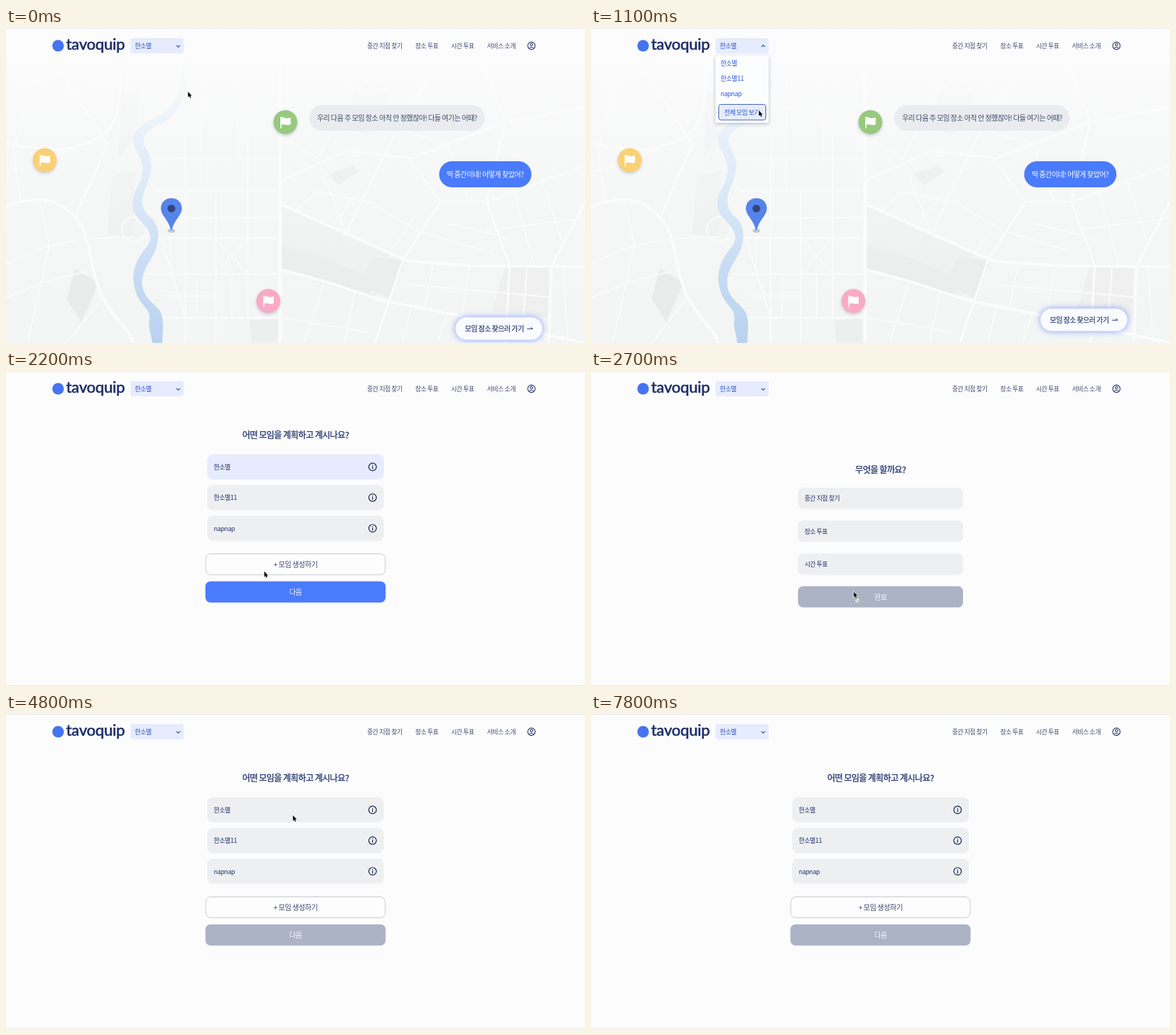
Animation of 800 by 435 pixels, one loop 7900 ms. Source, as an HTML page with a canvas:

```html
<!DOCTYPE html>
<html lang="ko">
<head>
<meta charset="utf-8">
<title>모임 장소 찾기</title>
<style>
html, body { margin: 0; width: 100%; height: 100%; overflow: hidden; background: #fcfcfd; }
canvas { display: block; width: 800px; height: 435px; }
</style>
</head>
<body>
<canvas id="stage" width="800" height="435"></canvas>
<script>
const ctx = document.getElementById('stage').getContext('2d');
const LOOP = 7900, STEP = 100;
const KO = '"Noto Sans CJK KR", "Noto Sans CJK JP", "Noto Sans CJK", sans-serif';
const NAVY = '#1d2f6b', BLUE = '#4a7bfc', PALE = '#e6ecfe', CARD = '#eeeff1', MUTED = '#abb3c4';
const GROUPS = ['한소별', '한소별11', 'napnap'];
const TASKS = ['중간 지점 찾기', '장소 투표', '시간 투표'];

// Pointer stops: time, x, y
const POINTER = [
  [0, 251.5, 88], [500, 236, 23], [700, 236, 23], [1000, 232, 114], [1300, 232, 114],
  [1700, 335, 130], [1900, 335, 130], [2300, 361, 304], [2500, 361, 304], [2700, 363, 305],
  [3200, 396.5, 142], [3300, 396.5, 140], [5200, 396.5, 140], [5700, 394.5, 179],
  [6500, 394.5, 179], [7200, 470, -14], [7900, 470, -14]
];

function pointerAt(t) {
  const i = POINTER.findIndex(p => p[0] > t);
  const [t0, x0, y0] = POINTER[i - 1], [t1, x1, y1] = POINTER[i];
  const u = (t - t0) / (t1 - t0), e = u * u * (3 - 2 * u);
  return [x0 + (x1 - x0) * e, y0 + (y1 - y0) * e];
}

function text(s, x, y, size, color, { align = 'left', weight = 500, bold = 0 } = {}) {
  ctx.font = `${weight} ${size}px ${KO}`;
  ctx.letterSpacing = `${-0.05 * size}px`;
  ctx.textAlign = align;
  ctx.textBaseline = 'alphabetic';
  ctx.fillStyle = color;
  ctx.fillText(s, x, y + size * 0.36);
  if (bold) {
    ctx.strokeStyle = color;
    ctx.lineWidth = bold;
    ctx.strokeText(s, x, y + size * 0.36);
  }
}

function box(x, y, w, h, r, fill, stroke) {
  ctx.beginPath();
  ctx.roundRect(x, y, w, h, r);
  if (fill) { ctx.fillStyle = fill; ctx.fill(); }
  if (stroke) { ctx.strokeStyle = stroke; ctx.lineWidth = 1; ctx.stroke(); }
}

function disc(x, y, r, fill) {
  ctx.beginPath();
  ctx.arc(x, y, r, 0, 7);
  ctx.fillStyle = fill;
  ctx.fill();
}

function ring(x, y, r, color, width) {
  ctx.beginPath();
  ctx.arc(x, y, r, 0, 7);
  ctx.strokeStyle = color;
  ctx.lineWidth = width;
  ctx.stroke();
}

function shape(d, fill) {
  ctx.fillStyle = fill;
  ctx.fill(new Path2D(d));
}

function line(d, color, width) {
  ctx.strokeStyle = color;
  ctx.lineWidth = width;
  ctx.stroke(new Path2D(d));
}

function shaded(color, blur, dy, draw) {
  ctx.save();
  ctx.shadowColor = color;
  ctx.shadowBlur = blur;
  ctx.shadowOffsetY = dy;
  draw();
  ctx.restore();
}

function map() {
  ctx.fillStyle = '#f4f5f5';
  ctx.fillRect(0, 0, 800, 435);

  // Blocks
  shape('M146 205L180 196 176 250 184 290 140 285Z', '#eeefef');
  shape('M95 332L128 352 104 406 84 374Z', '#e9eaea');
  shape('M336 404L376 400V435H340Z', '#edeeee');
  shape('M160 90L185 82 178 150 155 180Z', '#eeefef');
  shape('M381 246L530 312 512 372 381 332Z', '#eff0f0');
  shape('M381 300L440 318 512 346 500 372 381 335Z', '#ebecec');
  shape('M508 316L552 320 530 374 488 352Z', '#ebecec');
  shape('M690 326L750 328 748 400 672 390Z', '#eeefee');
  shape('M446 202L480 190 488 198 460 217Z', '#e9eaea');
  shape('M478 92L512 70 528 96 498 150 484 140Z', '#eeefef');

  // Streets
  const major = '#fcfcfc', minor = '#fafbfb';
  line('M0 246C40 232 70 232 96 262S112 330 134 372 168 410 176 435', major, 4);
  line('M0 158C50 172 92 172 130 150S156 60 160 0M96 262L140 160 74 60', major, 3);
  line('M0 325L60 300 104 292M0 372L50 352 112 336M30 435L60 300 46 236M84 435L134 372', minor, 2);
  line('M0 200L48 186 130 150M20 240L10 170 40 60M0 90L74 60 160 82M104 292L178 288', minor, 2);
  line('M205 225H376M212 262H376M208 290H376M196 340H376M214 400H376', minor, 2.5);
  line('M248 150V435M290 225V435M334 150V400M264 340V400M312 340V400M214 290L248 400', minor, 2.5);
  line('M200 180H376M240 110H376M270 60V225M320 40V180M218 370H290M228 262V340', minor, 1.6);
  line('M290 290H334V340H290ZL334 340M334 290L290 340', '#fbfbfb', 2);
  disc(312, 315, 6, '#fbfbfb');
  ring(312, 315, 4, '#ececec', 1);
  line('M160 278A14 14 0 0 0 194 278A14 14 0 0 0 160 278', minor, 2);
  disc(182, 278, 9, '#f0f1f1');

  line('M381 244L470 284 556 322 640 328 800 330', major, 4);
  line('M381 334L440 350 520 376 640 400 800 435', major, 4);
  line('M600 240L548 322 510 435M381 210L470 170 560 180 690 130 800 110', major, 3);
  line('M690 435L696 328 664 240 690 130 640 0M750 435L754 328 800 240', major, 3);
  line('M470 284L506 210 540 140 590 60M556 180L600 240 664 240 800 190', minor, 2.5);
  line('M381 150L430 180 470 284M430 180L480 90 450 0M540 140L610 160 640 240', minor, 2);
  line('M412 435L440 350M468 435L482 364M560 385L548 435M610 394L596 435M381 400L500 420', minor, 2);
  line('M590 328L578 386M640 328L630 400M556 354L690 366M610 270L694 290M576 282L674 312', minor, 2);
  line('M720 330L712 435M690 366L754 372M700 220L730 328M740 210L770 300M664 280L800 262', minor, 2);
  line('M400 253L430 226 506 242 574 284M450 276L482 232M530 310L566 260M770 330L776 435', minor, 1.8);

  ctx.fillStyle = '#fcfcfc';
  ctx.fillRect(376, 0, 5, 435);

  const water = ctx.createLinearGradient(0, 40, 0, 435);
  water.addColorStop(0, '#e4eefa');
  water.addColorStop(0.35, '#d3e5f7');
  water.addColorStop(1, '#b9d2f0');
  shape('M246 40C240 80 240 105 215 120C185 132 172 145 176 160C184 180 195 190 184 215' +
    'C172 235 172 250 182 262C196 278 205 285 196 300C180 320 172 335 178 360' +
    'C184 385 200 385 198 402C196 415 202 425 202 436L216 436C216 420 219 405 214 393' +
    'C206 380 188 372 188 352C188 330 205 318 209 298C214 275 205 266 196 258' +
    'C184 245 188 232 196 212C206 186 198 175 191 162C186 148 196 140 222 128' +
    'C245 112 250 80 254 40Z', water);

  const fade = ctx.createLinearGradient(0, 0, 0, 435);
  fade.addColorStop(0, 'rgba(252,252,253,1)');
  fade.addColorStop(0.1, 'rgba(252,252,253,.92)');
  fade.addColorStop(0.35, 'rgba(252,252,253,.45)');
  fade.addColorStop(0.75, 'rgba(252,252,253,.08)');
  fade.addColorStop(1, 'rgba(252,252,253,0)');
  ctx.fillStyle = fade;
  ctx.fillRect(0, 0, 800, 435);
}

function flag(x, y, color) {
  ctx.save();
  ctx.translate(x, y);
  shaded('rgba(60,70,90,.25)', 4, 2, () => disc(0, 0, 16.5, color));
  shape('M-7 -7.5H-5.4V-6.4C-2 -8 0 -4.8 3 -5.4L7.4 -6.2V3.2C3 5.4 0 2.2 -5.4 3.6V8.5H-7Z', '#fdfdfb');
  ctx.restore();
}

function pin() {
  ctx.beginPath();
  ctx.ellipse(228.5, 280, 5, 2.8, 0, 0, 7);
  ctx.fillStyle = '#bcc6d6';
  ctx.fill();
  shape('M228.5 235C237 235 243 241 243 249C243 259 232 265 229.3 279H227.7C225 265 214 259 214 249C214 241 220 235 228.5 235Z', '#5585ea');
  disc(228.5, 249.3, 5.4, '#33457f');
}

function home(t) {
  map();
  flag(386, 130, '#97c97e');
  flag(53.5, 182.5, '#fbd074');
  flag(362.5, 377, '#f9aac5');
  pin();
  box(419, 106.5, 242.5, 35.5, 17.7, '#eaecef');
  text('우리 다음 주 모임 장소 아직 안 정했잖아! 다들 여기는 어때?', 430, 124.5, 9.85, '#3c4668');
  box(598.5, 184, 127.5, 36, 18, BLUE);
  text('딱 중간이네! 어떻게 찾았어?', 609, 202, 9.85, '#ffffff');

  const y = 409 + 6 * Math.cos(t / 1100 * Math.PI);
  shaded('rgba(84,126,250,.75)', 10, 0, () => box(621, y - 15.5, 120, 31, 15.5, '#f9fbff'));
  text('모임 장소 찾으러 가기', 634, y, 9.75, '#26356b', { bold: 0.2 });
  line(`M720 ${y + 0.5}H728L725 ${y - 1.8}`, '#26356b', 0.9);
}

function chevron(up) {
  const d = up ? -1 : 1;
  line(`M235.5 ${25 - d * 1.2}L238 ${25 + d * 1.3}L240.5 ${25 - d * 1.2}`, '#2c4fb8', 1.2);
}

function header(open) {
  ctx.fillStyle = '#ececee';
  ctx.fillRect(0, 0, 800, 1);
  disc(72, 24.5, 8, '#4474f0');
  ctx.font = '500 21.5px Lato, sans-serif';
  ctx.letterSpacing = '-0.2px';
  ctx.textAlign = 'left';
  ctx.fillStyle = ctx.strokeStyle = '#1c2d68';
  ctx.lineWidth = 0.45;
  ctx.fillText('tavoquip', 83, 30);
  ctx.strokeText('tavoquip', 83, 30);

  box(172, 14, 73.5, 21, 3, PALE);
  text(GROUPS[0], 178, 25, 8.8, '#2b4fc4');
  chevron(open);
  [[...TASKS, '서비스 소개'], [499, 565.5, 615, 664.5]].reduce((names, xs) =>
    names.forEach((s, i) => text(s, xs[i], 25, 8.75, '#424c6e')));

  ring(726, 24.5, 5.1, '#2a366a', 1.1);
  ring(726, 23, 1.7, '#2a366a', 1);
  line('M722.6 28.2C724 26 728 26 729.4 28.2', '#2a366a', 1);
}

function dropdown(hover) {
  shaded('rgba(40,50,80,.3)', 5, 1.5, () => box(172, 38, 73.5, 93, 2, '#fcfdfe'));
  GROUPS.forEach((s, i) => text(s, 179, 48.5 + 21.4 * i, 8.8, '#2a54d8'));
  box(176.5, 105.5, 65, 21.5, 3, hover ? PALE : '#fcfdfe', '#4a66b4');
  text('전체 모임 보기', 184, 116.5, 8.8, '#2a54d8');
}

function info(x, y) {
  ring(x, y, 5.2, '#18264f', 1.2);
  ctx.fillStyle = '#18264f';
  ctx.fillRect(x - 0.6, y - 0.9, 1.2, 3.8);
  ctx.fillRect(x - 0.6, y - 2.9, 1.2, 1.2);
}

function blank() {
  ctx.fillStyle = '#fcfcfd';
  ctx.fillRect(0, 0, 800, 435);
  ctx.fillStyle = '#ececee';
  ctx.fillRect(0, 434, 800, 1);
}

function groupPage(chosen) {
  blank();
  text('어떤 모임을 계획하고 계시나요?', 400, 89, 12, NAVY, { align: 'center', bold: 0.25 });
  GROUPS.forEach((s, i) => {
    const y = 115 + 42.4 * i, on = chosen && i === 0;
    box(278, y, 244, 34.8, 8, on ? PALE : CARD);
    text(s, 287, y + 17.8, 8.8, NAVY);
    info(506.5, y + 17.4);
  });
  box(276, 252.5, 248, 28.8, 7, '#fdfdfe', '#c9ccd2');
  text('+ 모임 생성하기', 400, 267.2, 10, '#3b4566', { align: 'center' });
  box(275.5, 290.5, 249, 29.2, 7, chosen ? BLUE : MUTED);
  text('다음', 400, 305.5, 9.85, '#f8f9fb', { align: 'center' });
}

function taskPage() {
  blank();
  text('무엇을 할까요?', 400, 136.5, 12, NAVY, { align: 'center', bold: 0.25 });
  TASKS.forEach((s, i) => {
    const y = 161 + 45.5 * i;
    box(286, y, 228, 29.4, 7, CARD);
    text(s, 295, y + 15, 8.75, NAVY);
  });
  box(286, 297.2, 228, 29.4, 7, MUTED);
  text('완료', 400, 312.2, 9.85, '#f8f9fb', { align: 'center' });
}

function swipeBack(t) {
  const shown = Math.min(1, (t - 3500) / 500);
  ctx.save();
  ctx.translate(-40 * (1 - shown), 0);
  disc(-3, 225, 40, '#383838');
  ctx.lineCap = ctx.lineJoin = 'round';
  line('M28 225H10M18.5 216L9.5 225L18.5 234', '#ffffff', 4.4);
  ctx.restore();
}

function pointer(t) {
  const [x, y] = pointerAt(t);
  ctx.save();
  ctx.translate(x, y);
  if (t >= 3600 && t < 4800) {
    line('M-1.6 -4.4Q0.4 -4.4 0.4 -3V3Q0.4 4.4 -1.6 4.4M2.4 -4.4Q0.4 -4.4 0.4 -3M2.4 4.4Q0.4 4.4 0.4 3M-0.8 0.8H1.6', '#1c1c1c', 0.9);
  } else {
    const arrow = 'M0 0V7.6L1.7 6.1L2.9 8.8L4.2 8.2L3 5.6H5.3Z';
    line(arrow, '#ffffff', 1.2);
    shape(arrow, '#000000');
    if (t >= 2500 && t < 2900) {
      disc(5, 11.8, 4.4, '#f4f4f5');
      ring(5, 11.8, 3.7, '#7d8088', 1);
      line('M2.4 9.2L7.6 14.4', '#7d8088', 1);
    }
  }
  ctx.restore();
}

function draw(t) {
  const open = t >= 600 && t < 1400;
  if (t < 1400) home(t);
  else if (t >= 2500 && t < 4700) taskPage();
  else groupPage(t >= 1900 && t < 2500);
  header(open);
  if (open) dropdown(t >= 1000);
  if (t >= 3600 && t < 4700) swipeBack(t);
  pointer(t);
}

let last = -1;
const start = performance.now();
function tick() {
  const t = Math.floor((performance.now() - start) % LOOP / STEP) * STEP;
  if (t !== last) draw(last = t);
  requestAnimationFrame(tick);
}
tick();
</script>
</body>
</html>
```
